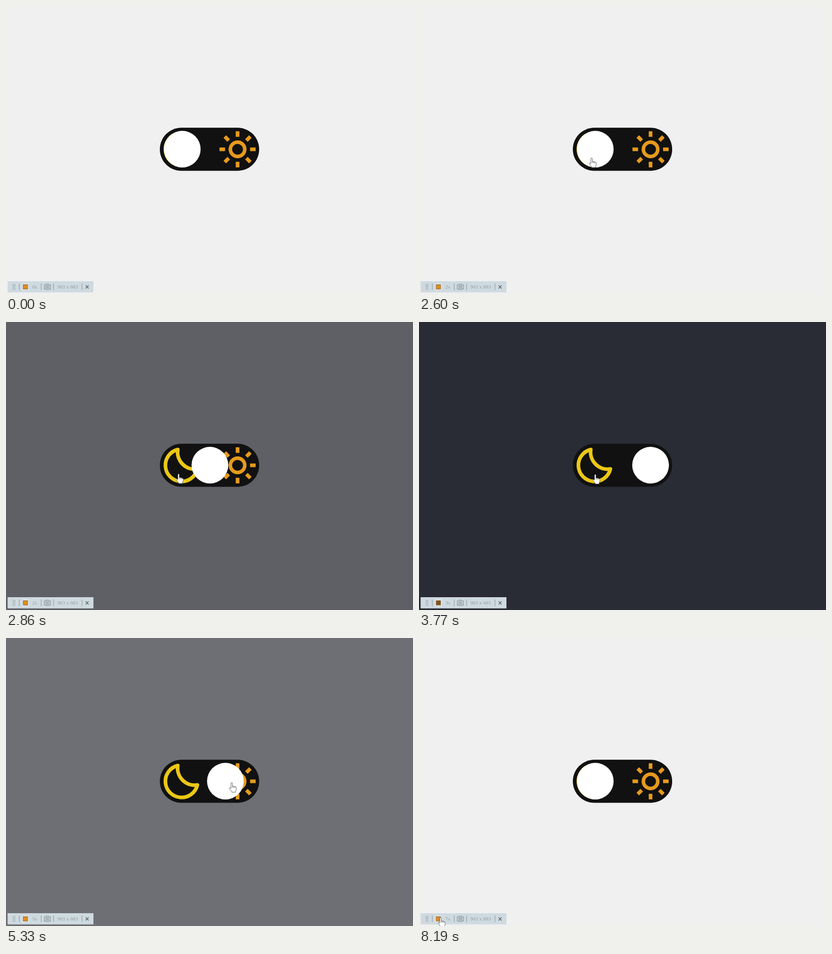
Animation of 889x630 px, one loop 8320 ms. Source, as an HTML page:

```html
<!DOCTYPE html>
<html lang="en">
<head>
<meta charset="utf-8">
<title>Theme toggle</title>
<style>
  html, body { margin: 0; width: 100%; height: 100%; overflow: hidden; background: #f0f0f0; }
  svg { display: block; width: 889px; height: 630px; }
  text { font: 11.25px "Liberation Serif", "Times New Roman", serif; fill: #929ba1; }
</style>
</head>
<body>
<svg viewBox="0 0 889 630">
  <rect id="page" width="889" height="630" fill="#f0f0f0"/>

  <rect x="336" y="266.3" width="217" height="94.2" rx="47.1" fill="#111"/>
  <path d="M375.2 279A35.4 35.4 0 1 0 418 321.5A37.5 37.5 0 0 1 375.2 279Z"
        fill="none" stroke="#ebc715" stroke-width="8" stroke-linejoin="round"/>
  <g id="sun" transform="translate(505.8 313.5)" fill="#e69a1c">
    <circle r="15.7" fill="none" stroke="#e69a1c" stroke-width="7.8"/>
  </g>
  <circle id="knob" cx="385" cy="313.2" r="40.1" fill="#fff"/>

  <g id="bar">
    <rect x="3.5" y="602" width="187.5" height="24.5" fill="#cfdae0"/>
    <path d="M15.6 608V621M19.2 608V621" stroke="#7f8a91" stroke-width="1.5" stroke-dasharray="1.5 1.3"/>
    <path d="M29 607V621.5M77 607V621.5M104 607V621.5M166 607V621.5" stroke="#818c93"/>
    <rect x="34.5" y="606.5" width="15.5" height="16" fill="#dce2e6"/>
    <rect id="rec" x="37.7" y="609.7" width="9.4" height="9.4" fill="#e28c1a" stroke="#7b5a2c" stroke-width=".9"/>
    <text id="secs" x="57.6" y="618">0s</text>
    <g fill="none" stroke="#87929a" stroke-width="1.3">
      <path d="M83.7 610.2H86.4L87.6 608.4H93.2L94.4 610.2H97.2V619H94.4L93.2 620.4H87.6L86.4 619H83.7Z"/>
      <circle cx="90.4" cy="614.4" r="3.5"/>
      <circle cx="90.4" cy="614.4" r="1"/>
    </g>
    <text x="112" y="618">963 x 683</text>
    <path d="M174 611L180.4 617.8M180.4 611L174 617.8" stroke="#606a70" stroke-width="1.7"/>
  </g>

  <g id="cursor" fill="#fff" stroke="#4a4a50" stroke-width=".9" stroke-linejoin="round">
    <path id="arrow" d="M0 0V15L3.5 11.8 5.9 17 8.1 16 5.8 10.9H10.5Z"/>
    <g id="hand">
      <path d="M-1.6 1A1.6 1.6 0 0 1 1.6 1V7L4.2 7.3 7 8 9.4 9.2Q10.4 9.8 10.4 11.2L9.8 15.7 8.6 17.7V20.3H0V18.7L-4.8 12.7Q-5.6 11 -4.2 10.5-3 10.3-1.6 12Z"/>
      <path d="M1.6 7V10.5M4.5 7.5V10.8M7.3 8.2V11" fill="none"/>
    </g>
  </g>
</svg>
<script>
const LOOP = 8320, STEP = 130, SLIDE = 500;
const LIGHT = [240, 240, 240], DARK = [41, 44, 53];
const $ = id => document.getElementById(id);

// time, x, y of the pointer tip
const PATH = [
  [520, 58, 604], [1300, 235, 450], [2080, 377, 333], [3640, 377, 333],
  [3770, 385, 334], [4550, 493, 317], [5980, 493, 317], [6240, 338, 360],
  [6370, 259, 390], [6890, 130, 520], [7800, 50, 602], [8060, 47, 612], [8320, 47, 612]
];

const clamp = v => Math.min(1, Math.max(0, v));
const mix = (a, b, p) => a + (b - a) * p;
const bezier = (a, b, u) => 3 * (1 - u) ** 2 * u * a + 3 * (1 - u) * u * u * b + u ** 3;

// CSS "ease"
function ease(x) {
  let lo = 0, hi = 1;
  for (let i = 0; i < 24; i++) {
    const mid = (lo + hi) / 2;
    if (bezier(.25, .25, mid) < x) lo = mid; else hi = mid;
  }
  return bezier(.1, 1, lo);
}

const ramp = (t, start) => clamp((t - start) / SLIDE);

function pointer(t) {
  const i = PATH.findIndex(k => k[0] > t);
  if (i < 1) return null;
  const a = PATH[i - 1], b = PATH[i], p = (t - a[0]) / (b[0] - a[0]);
  return [mix(a[1], b[1], p), mix(a[2], b[2], p)];
}

function overTarget(x, y) {
  const inPill = Math.hypot(x - Math.min(506, Math.max(383, x)), y - 313.4) < 47;
  return inPill || (x > 34 && x < 51 && y > 606);
}

function draw(t) {
  const slide = ramp(t, 2610) - ramp(t, 5220);
  const shade = ease(ramp(t, 2640)) - ease(ramp(t, 5220));
  const rgb = LIGHT.map((c, i) => Math.round(mix(c, DARK[i], shade)));
  $("page").setAttribute("fill", `rgb(${rgb})`);
  $("knob").setAttribute("cx", mix(385, 505.8, slide));
  $("secs").textContent = Math.floor(t / 1040) + "s";
  $("rec").setAttribute("fill", t >= 3770 && t < 4030 ? "#84511a" : "#e28c1a");

  const at = pointer(t);
  $("cursor").style.display = at ? "" : "none";
  if (!at) return;
  const hand = overTarget(...at);
  $("cursor").setAttribute("transform", `translate(${at})`);
  $("hand").style.display = hand ? "" : "none";
  $("arrow").style.display = hand ? "none" : "";
}

for (let i = 0; i < 8; i++) {
  const ray = document.createElementNS("http://www.w3.org/2000/svg", "rect");
  const set = { x: 27.3, y: -4, width: 12.2, height: 8, rx: .8, transform: `rotate(${i * 45})` };
  for (const k in set) ray.setAttribute(k, set[k]);
  $("sun").append(ray);
}

const begin = performance.now();
function tick() {
  const t = (performance.now() - begin) % LOOP;
  draw(Math.floor(t / STEP) * STEP);
  requestAnimationFrame(tick);
}
tick();
</script>
</body>
</html>
```
